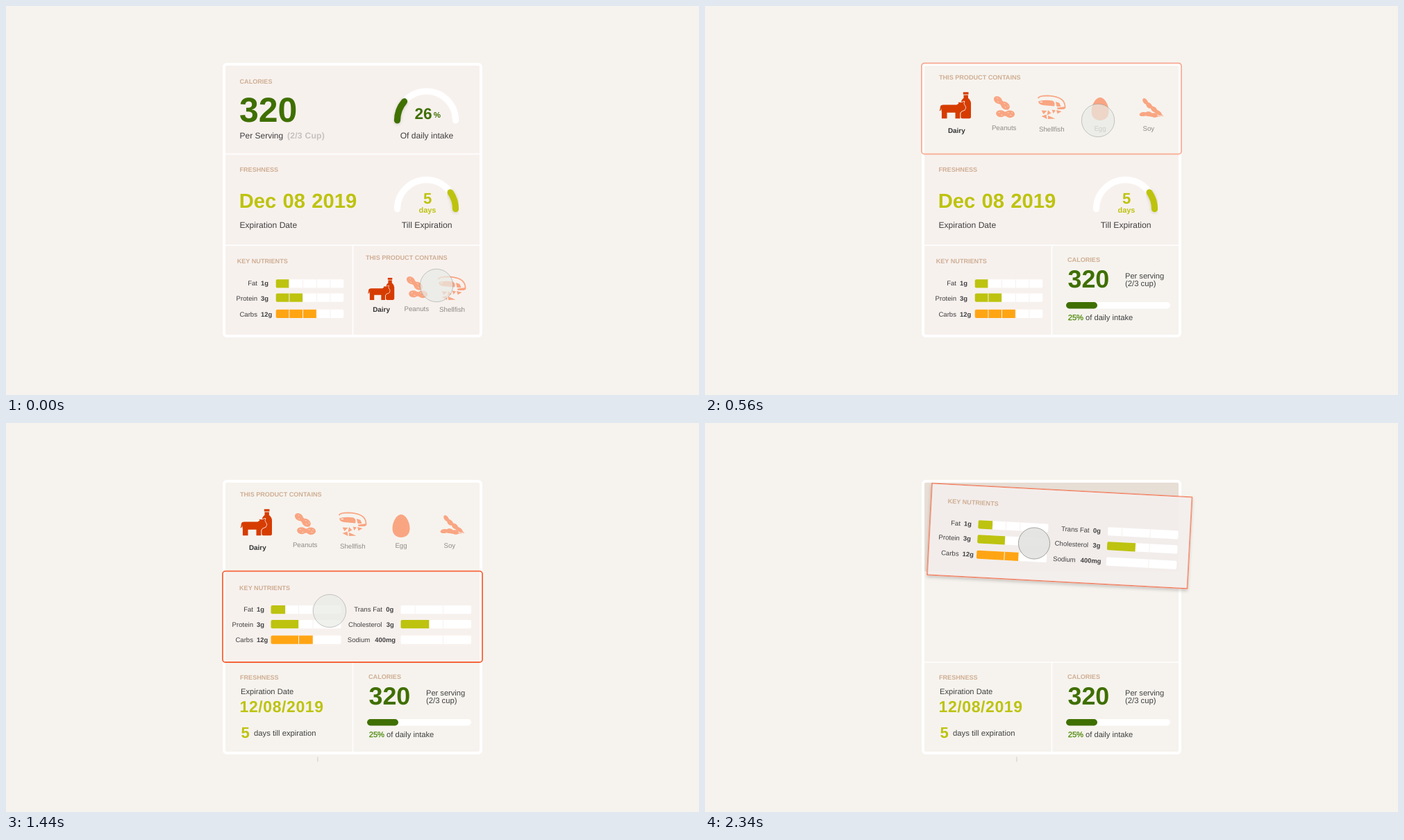
These frames come from a looping animation (998 by 561 pixels, 2440 ms). An HTML page:

```html
<!DOCTYPE html>
<html lang="en">
<head>
<meta charset="utf-8">
<title>Food label cards</title>
<style>
html, body { margin: 0; width: 100%; height: 100%; overflow: hidden; background: #f6f3ee; }
svg { display: block; width: 100%; height: 100%; }
text { font-family: "Liberation Sans", Arial, sans-serif; white-space: pre; text-rendering: geometricPrecision; }
</style>
</head>
<body>
<svg id="stage" viewBox="0 0 998 561"></svg>
<script>
const C = {
  bg: '#f6f3ee', pink: '#f7f1ee', tan: '#cfae93', ink: '#404040', soft: '#8f8a86',
  green: '#3f6f00', olive: '#bdc30f', orange: '#ffa514', red: '#d63c00',
  salmon: '#f9a582', edge: '#f4653a', hover: '#e7ded5'
};

// ---- drawing helpers ----
const text = (x, y, s, size, fill = C.ink, bold = false, extra = '') =>
  `<text x="${x}" y="${y}" font-size="${size}" fill="${fill}"${bold ? ' font-weight="700"' : ''} ${extra}>${s}</text>`;
const END = 'text-anchor="end"', MID = 'text-anchor="middle"';
const title = (x, y, s) => text(x, y, s, 9.1, C.tan, true);
const box = (x, y, w, h, fill, rx = 0, extra = '') =>
  `<rect x="${x}" y="${y}" width="${w}" height="${h}" rx="${rx}" fill="${fill}" ${extra}/>`;
const path = (d, fill, extra = '') => `<path d="${d}" fill="${fill}" ${extra}/>`;
const group = (id, body, extra = '') => `<g id="${id}" ${extra}>${body}</g>`;
const at = (x, y, body, scale = 1) => `<g transform="translate(${x} ${y}) scale(${scale})">${body}</g>`;
const oval = (x, y, rx, ry, turn = 0, fill = C.salmon) =>
  `<ellipse rx="${rx}" ry="${ry}" fill="${fill}" transform="translate(${x} ${y}) rotate(${turn})"/>`;

function gauge(cx, cy, from, to, color) {
  const r = 42;
  const point = deg => {
    const a = deg * Math.PI / 180;
    return `${(cx - r * Math.cos(a)).toFixed(2)} ${(cy - r * Math.sin(a)).toFixed(2)}`;
  };
  const arc = (a, b, stroke, extra = '') =>
    path(`M${point(a)}A${r} ${r} 0 0 1 ${point(b)}`, 'none',
      `stroke="${stroke}" stroke-width="9.2" stroke-linecap="round" ${extra}`);
  return arc(0, 180, '#fff') + arc(from, to, color, 'filter="url(#glow)"');
}

function bar(x, y, w, filled, color, seams) {
  const h = 12.2;
  return box(x, y, w, h, '#fff', 2) +
    (filled ? path(`M${x + filled} ${y}V${y + h}H${x + 2}q-2 0 -2-2V${y + 2}q0-2 2-2z`, color) : '') +
    seams.map(s => box(x + s - 0.5, y, 1, h, C.pink)).join('');
}

function nutrient(nameX, valueX, base, name, value) {
  return text(nameX, base, name, 9.6, C.ink, false, END) + text(valueX, base, value, 9.4, C.ink, true);
}

// ---- icons ----
const dairyIcon =
  path('M34.3 0H42V3.2H34.3zM35 4.2H41.4V8.5Q45.5 12 45.5 16V35.5Q45.5 38 43 38H33Q30.8 38 30.8 35.5V16Q30.8 12 35 8.5z', C.red) +
  path('M0 27Q1.2 25 1.3 21.5Q1.6 18.2 6 18.2H25L28 16.2L27 14.5L31 15L36 13.5L35 16.5L38 22L36.5 25.5L32 27.5L29.8 30V38H23V29.5H11V38H3.4V29L2.6 23Q2.6 27 0 27z', C.red,
    `stroke="${C.bg}" stroke-width="1.5" stroke-linejoin="round" paint-order="stroke"`);

const peanut = (x, y, turn) => at(x, y, `<g transform="rotate(${turn})">` +
  oval(-6.8, 0, 6.6, 5) + oval(6.6, 0, 7, 5.3) + box(-3, -3.2, 6, 6.4, C.salmon) +
  path('M-10-1.5h2M-6 2h2M3-2h2M7 1.5h2M9-2h1.5', 'none', `stroke="${C.bg}" stroke-width=".8" opacity=".8"`) + '</g>');
const peanutIcon = peanut(11.8, 9.3, 38) + peanut(17, 25, 3);

const shrimpIcon =
  path('M1 5Q3 1.4 14 1.4Q33 2 38 10Q41 15 39.5 20', 'none', `stroke="${C.salmon}" stroke-width="1.7"`) +
  path('M1.5 9.5Q9 6.5 22 8.5Q26.5 11 24.5 16.5L8 15Q2 14 1.5 9.5z', C.salmon) +
  path('M4 10.5h3.5', 'none', `stroke="${C.bg}" stroke-width="1.2"`) +
  path('M26.5 10L32 12L34 17L28 17zM28.5 18.5L41 17L38.5 21L29 21zM27.5 22L35 24L29 27.5zM21 21.5L26.5 22.5L23 27zM6 22.5L14 23L9 28zM15.5 22L20 26.5L14 29.5zM6 31L13 28.5L14 35zM15.5 30L26 34.5L15.5 35z', C.salmon);

const eggIcon = path('M12.5 0C19 0 25 10.5 25 20C25 28 20 33 12.5 33C5 33 0 28 0 20C0 10.5 6 0 12.5 0z', C.salmon);

const soyIcon =
  path('M5.5 0L35.8 27L24 23zM0 25L35.8 27L20 28z', C.salmon) +
  oval(9, 5.5, 4.8, 3, 55) + oval(14.5, 11.5, 5, 3.4, 45) + oval(21.5, 17, 5, 3.5, 38) + oval(28, 22, 5, 2.8, 38) +
  oval(6, 24, 5.5, 3, -10) + oval(14, 23.5, 5, 3.4, 8) + oval(22, 25.5, 5, 3.2, 12);

// ---- panels ----
const caloriesBig =
  title(336.5, 111.5, 'CALORIES') +
  text(336, 167, '320', 50, C.green, true) +
  text(336.5, 190.5, 'Per Serving', 12) +
  text(405, 190.5, '(2/3 Cup)', 12.2, '#c6c1be', true, 'letter-spacing=".2"') +
  group('intake', gauge(605.5, 165, 0, 40.5, C.green) +
    text(588.5, 162.7, '26', 22.5, C.green, true) + text(615.7, 161.3, '%', 11.5, C.green, true)) +
  text(606, 190.5, 'Of daily intake', 12.1, C.ink, false, MID);

const freshBig =
  title(336.5, 239, 'FRESHNESS') +
  text(335.7, 291, 'Dec 08 2019', 29.2, C.olive, true, 'word-spacing="1.2"') +
  text(336.5, 320, 'Expiration Date', 12.1) +
  gauge(605.5, 292.7, 145.5, 180, C.olive) +
  text(607, 284.7, '5', 22, C.olive, true, MID) + text(607, 298.3, 'days', 10.9, C.olive, true, MID) +
  text(606.2, 320, 'Till Expiration', 12.2, C.ink, false, MID);

const fifths = [19.2, 38.8, 58.6, 78.2];
const nutrientsSmall =
  title(332.7, 371.3, 'KEY NUTRIENTS') +
  nutrient(362, 367, 403.2, 'Fat', '1g') + bar(388.7, 394.2, 97.6, 19, C.olive, fifths) +
  nutrient(362, 367, 424.6, 'Protein', '3g') + bar(388.7, 414.5, 97.6, 38.4, C.olive, fifths) +
  nutrient(362, 367, 448.4, 'Carbs', '12g') + bar(388.7, 437.8, 97.6, 58.4, C.orange, fifths);

const containsSmall =
  title(518, 365.8, 'THIS PRODUCT CONTAINS') +
  at(521, 392, dairyIcon, 0.84) + at(576.5, 390.5, peanutIcon) + at(621.5, 389, shrimpIcon) +
  text(540.6, 441, 'Dairy', 9.9, '#333', true, MID) +
  text(591.3, 440.3, 'Peanuts', 9.7, C.soft, false, MID) +
  text(642.5, 441, 'Shellfish', 9.8, C.soft, false, MID);

const containsBig =
  title(337, 106, 'THIS PRODUCT CONTAINS') +
  at(337.5, 124.3, dairyIcon) + at(415.5, 130.5, peanutIcon) + at(478.5, 128, shrimpIcon) +
  at(556.5, 132, eggIcon) + at(625, 132, soyIcon) +
  text(362.3, 183, 'Dairy', 9.9, '#333', true, MID) +
  [['Peanuts', 430.7, 179.3], ['Shellfish', 499.3, 181.2], ['Egg', 569, 180.4], ['Soy', 638.8, 180.4]]
    .map(([s, x, y]) => text(x, y, s, 9.7, C.soft, false, MID)).join('');

const caloriesSmall =
  title(522, 368.8, 'CALORIES') +
  text(522.5, 406.3, '320', 35.8, C.green, true) +
  text(605, 392.8, 'Per serving', 11.1) + text(605, 404.3, '(2/3 cup)', 11.3) +
  box(520, 427, 150, 9.4, '#fff', 4.7) + box(520, 427, 45, 9.4, C.green, 4.7) +
  text(522.7, 453, '<tspan fill="#478500" stroke="#478500" stroke-width=".25">25%</tspan> of daily intake', 11.15);

const freshSmall =
  title(337, 370, 'FRESHNESS') +
  text(338, 390.7, 'Expiration Date', 11.15) +
  text(336.5, 417, '12/08/2019', 23, C.olive, true, 'letter-spacing=".6"') +
  text(338.5, 454.3, '5', 22, C.olive, true) + text(357, 451, 'days till expiration', 11.25);

const nutrientsBig =
  title(336, 241, 'KEY NUTRIENTS') +
  nutrient(356, 361, 272.3, 'Fat', '1g') + bar(381.5, 263, 101, 20.8, C.olive, [21, 40, 60.5]) +
  nutrient(356, 361, 293.6, 'Protein', '3g') + bar(381.5, 284, 101, 39.7, C.olive, [60.5]) +
  nutrient(356, 361, 316, 'Carbs', '12g') + bar(381.5, 306.5, 101, 60.3, C.orange, [40]) +
  nutrient(542, 547.3, 272.3, 'Trans Fat', '0g') + bar(568.5, 263, 101.5, 0, '', [20.5, 61]) +
  nutrient(541.5, 547.8, 293.6, 'Cholesterol', '3g') + bar(568.5, 284, 101.5, 40.8, C.olive, [61]) +
  nutrient(524.3, 531.3, 316, 'Sodium', '400mg') + bar(568.5, 306.5, 101.5, 0, '', [61]);

// Draggable cards: resting box and the rectangle that shows while lifted.
const cards = {
  contains: { x: 498.3, y: 344.7, w: 188.3, h: 132.4, body: containsSmall },
  small: { x: 313, y: 344.5, w: 188, h: 132, body: nutrientsSmall },
  wide: { x: 312, y: 213.5, w: 375, h: 132, body: nutrientsBig }
};
const cardSvg = (id, c) => group(id,
  box(c.x, c.y, c.w, c.h, '#f5f0ee', 0, `id="${id}Lift" fill-opacity=".93" stroke="${C.edge}" stroke-width="1.2" filter="url(#shadow)"`) + c.body);
const outline = (id, y, h) =>
  box(312, y, 374, h, 'none', 4, `id="${id}" stroke="${C.edge}" stroke-width="1.8"`);

document.getElementById('stage').innerHTML =
  `<defs>
    <filter id="shadow" x="-10%" y="-10%" width="120%" height="125%"><feDropShadow dx="0" dy="3" stdDeviation="2.2" flood-color="#000" flood-opacity=".2"/></filter>
    <filter id="glow" x="-60%" y="-60%" width="220%" height="220%"><feDropShadow dx="0" dy="1" stdDeviation="2" flood-color="#000" flood-opacity=".18"/></filter>
  </defs>` +
  box(0, 0, 998, 561, C.bg) +
  box(316, 86, 367, 127, C.pink, 0, 'id="pinkTop"') + box(316, 214, 367, 131, C.pink, 0, 'id="pinkMid"') +
  box(316, 345, 183, 130, C.pink, 0, 'id="pinkLeft"') + box(499, 345, 184, 130, C.pink, 0, 'id="pinkRight"') +
  path('M316 213.5H682M316 345H682M499.5 345V474', 'none', 'stroke="#fff" stroke-width="1.6"') +
  box(316, 86, 367, 128.3, C.hover, 0, 'id="hoverTop"') + box(316, 214.3, 367, 131.5, '#ebe6de', 0, 'id="hoverMid"') +
  box(314, 84, 370, 392, 'none', 4, 'stroke="#fff" stroke-width="4"') +
  box(448.5, 481.5, 0.9, 7, '#c9c6c1', 0, 'id="tick"') +
  group('caloriesBig', caloriesBig) + group('containsBig', containsBig) + group('freshBig', freshBig) +
  group('caloriesSmall', caloriesSmall) + group('freshSmall', freshSmall) +
  outline('ringTop', 82.5, 131) + outline('ringMid', 213.7, 131.3) +
  Object.entries(cards).map(([id, c]) => cardSvg(id, c)).join('') +
  `<circle id="touch" stroke="#8e8e8c" stroke-width=".8"/>`;

// ---- motion ----
const $ = id => document.getElementById(id);
const show = (id, o) => {
  $(id).setAttribute('opacity', +o);
  $(id).style.display = +o ? '' : 'none';
};
const during = (t, a, b) => t >= a && t < b;

// Linear track of [time, ...values].
function track(t, keys) {
  let i = keys.findIndex(k => k[0] > t);
  if (i === 0) return keys[0].slice(1);
  if (i < 0) return keys[keys.length - 1].slice(1);
  const a = keys[i - 1], b = keys[i], p = (t - a[0]) / (b[0] - a[0]);
  return a.slice(1).map((v, n) => v + (b[n + 1] - v) * p);
}

const moves = {
  contains: [[80, 498.3, 344.7, 0], [120, 500, 335, 2.5], [160, 501, 316, 5.5], [220, 489, 250, 6.8], [300, 467, 145, 6.86], [360, 458, 103.5, 6.86]],
  small: [[940, 313, 344.5, 0], [1040, 322, 331, 6.9], [1140, 339, 235, 7], [1240, 341, 199, 5]],
  wide: [[1840, 312, 213.5, 0], [1940, 318, 206, 1.1], [2040, 325, 198, 2.15], [2140, 326, 166, 2.6], [2240, 326.5, 126, 2.9], [2340, 327, 87, 3.05]]
};
const touchPath = [
  [80, 620, 403], [120, 619, 397], [160, 615, 387], [220, 603, 322], [300, 580, 219], [360, 570, 177], [400, 566, 165],
  [560, 566, 165], [640, 545, 205], [740, 474, 330], [840, 440, 399], [940, 440, 399],
  [1040, 440, 404], [1140, 457, 310], [1240, 463, 278], [1340, 466, 271], [1640, 466, 271],
  [1740, 467, 276], [1840, 469, 281], [2040, 477, 282.5], [2140, 476, 252], [2240, 475, 211], [2340, 474, 173.5]
];

function placeCard(id, t, lifted) {
  const c = cards[id], [x, y, a] = track(t, moves[id]);
  $(id).setAttribute('transform', `translate(${x} ${y}) rotate(${a}) translate(${-c.x} ${-c.y})`);
  show(id + 'Lift', lifted);
}

function draw(t) {
  const early = t < 400, swapped = t >= 1340;
  show('pinkTop', early);
  show('pinkRight', t < 80);
  show('pinkLeft', t < 940);
  show('pinkMid', t < 1840);
  show('hoverTop', during(t, 280, 400) || t >= 2340);
  show('hoverMid', during(t, 1140, 1340));

  show('caloriesBig', early ? track(t, [[240, 1], [320, 0.45], [360, 0.26]])[0] : 0);
  show('intake', track(t, [[240, 1], [360, 0]])[0]);
  $('caloriesBig').setAttribute('transform', during(t, 280, 400) ? 'translate(1 0)' : '');
  show('containsBig', early ? 0 : t >= 2340 ? 0.06 : 1);
  show('caloriesSmall', !early);
  show('freshBig', swapped ? 0 : track(t, [[1040, 1], [1140, 0.55], [1240, 0.15]])[0]);
  show('freshSmall', swapped);

  show('contains', early);
  show('small', t < 1340);
  show('wide', swapped);
  placeCard('contains', t, t >= 80);
  placeCard('small', t, t >= 940);
  placeCard('wide', t, t >= 1840);

  show('ringTop', during(t, 400, 560) ? 1 : during(t, 560, 600) ? 0.5 : 0);
  show('ringMid', during(t, 1340, 1540) ? 1 : during(t, 1540, 1640) ? 0.5 : 0);
  show('tick', t >= 1040);

  const pressed = during(t, 40, 400) || during(t, 940, 1340) || t >= 1740;
  const [x, y] = track(t, touchPath), touch = $('touch');
  touch.setAttribute('cx', x);
  touch.setAttribute('cy', y);
  touch.setAttribute('r', pressed ? 22.6 : 23.7);
  touch.setAttribute('fill', pressed ? '#e4e4e2' : '#e9ebe5');
  touch.setAttribute('fill-opacity', t >= 1840 ? 0.95 : during(t, 940, 1340) ? 0.84 : 0.7);
  touch.setAttribute('stroke-opacity', pressed ? 1 : 0.6);
}

// The picture advances in 40 ms steps, then in 100 ms steps.
const LOOP = 2440, SLOW = 640;
const step = t => t < SLOW ? Math.floor(t / 40) * 40 : SLOW + Math.floor((t - SLOW) / 100) * 100;

const start = performance.now();
function tick(now) {
  draw(step(Math.max(0, now - start) % LOOP));
  requestAnimationFrame(tick);
}
draw(0);
requestAnimationFrame(tick);
</script>
</body>
</html>
```
